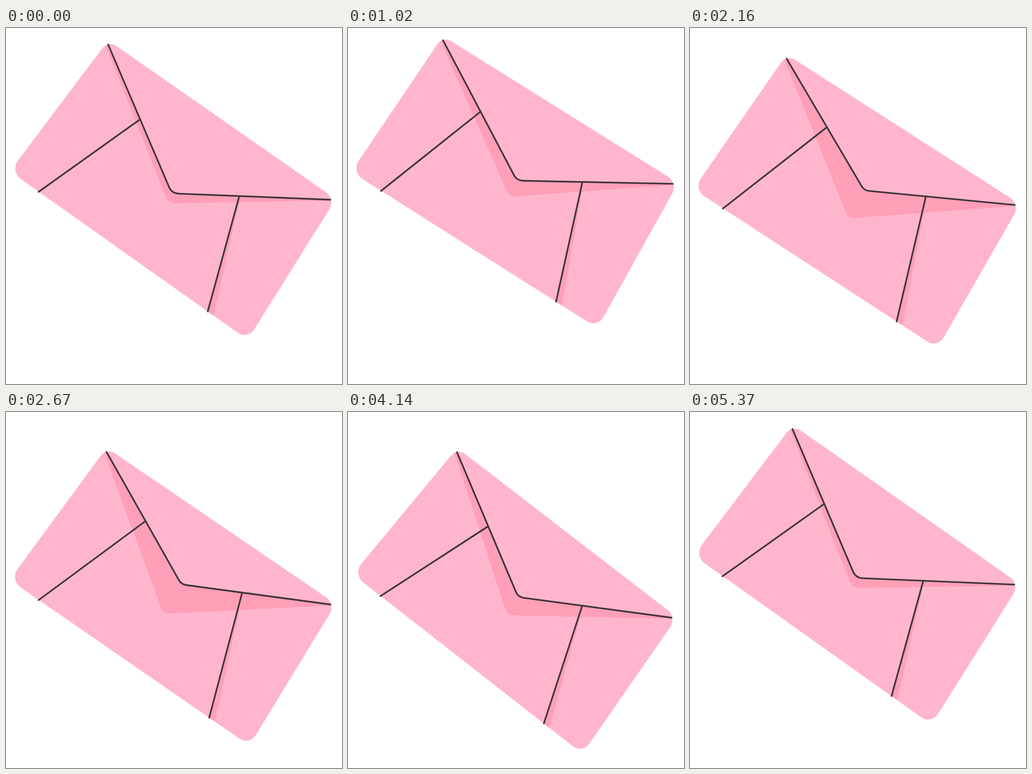
Recreate the animation shown at these times as an HTML page with a canvas. Size 727 px wide and 770 px high, loop 5.4 s.

```html
<!DOCTYPE html>
<html lang="en">
<head>
<meta charset="utf-8">
<title>Floating envelope</title>
<style>
  html, body { margin: 0; width: 100%; height: 100%; overflow: hidden; background: #fff; }
  canvas { display: block; width: 727px; height: 770px; }
</style>
</head>
<body>
<canvas id="stage" width="727" height="770"></canvas>
<script>
const ctx = document.getElementById("stage").getContext("2d");
const LOOP = 5400, STEP = 30;
const BODY = "#ffb6cd", SHADE = "#ff9fb8", INK = "#403738";

// Envelope space: origin midway between the two flap ends, x along the top.
const LEFT = [-293.1, 0], RIGHT = [293.1, 0];
const LEFT_FOOT = [-234.3, 347.6], RIGHT_FOOT = [214, 350];
const CORNERS = [
  [-298.1, -7.8, 22.3],
  [301.9, -7.8, 27],
  [319.9, 350.8, 24.7],
  [-310.7, 346.6, 28]
];

const mix = (a, b, k) => [a[0] + (b[0] - a[0]) * k, a[1] + (b[1] - a[1]) * k];

function bodyPath() {
  ctx.beginPath();
  ctx.moveTo(0, -7.8);
  for (let i = 1; i <= 4; i++) {
    const [x, y, r] = CORNERS[i % 4];
    const next = CORNERS[(i + 1) % 4];
    ctx.arcTo(x, y, next[0], next[1], r);
  }
  ctx.closePath();
}

function flapPath(a, tip, b, r) {
  ctx.beginPath();
  ctx.moveTo(...a);
  ctx.arcTo(...tip, ...b, r);
  ctx.lineTo(...b);
}

function line(a, b) {
  ctx.beginPath();
  ctx.moveTo(...a);
  ctx.lineTo(...b);
  ctx.stroke();
}

function draw(time) {
  const p = time / LOOP * Math.PI * 2;
  const c = Math.cos(p), s = Math.sin(p);

  const angle = 34.64 + 0.28 * c - 2.97 * s;
  const y = 368.75 - 25.1 * c - 35.1 * s;
  const tip = [2.9 + c, 165.4 + 19.7 * c];
  const shadeTip = [7.9 + 2.2 * c - 0.4 * s, 213.7 - 6.6 * c];
  const leftJoin = mix(LEFT, tip, 0.512 - 0.0095 * c);
  const rightJoin = mix(RIGHT, tip, 0.583 - 0.009 * c);

  ctx.setTransform(1, 0, 0, 1, 0, 0);
  ctx.fillStyle = "#fff";
  ctx.fillRect(0, 0, 727, 770);
  ctx.translate(360.5, y);
  ctx.rotate(angle * Math.PI / 180);
  ctx.translate(2.6, -172.6);

  bodyPath();
  ctx.fillStyle = BODY;
  ctx.fill();

  // Shadows stay inside the body
  ctx.save();
  ctx.clip();
  ctx.fillStyle = SHADE;
  ctx.beginPath();
  ctx.moveTo(...rightJoin);
  ctx.lineTo(rightJoin[0] + 2.2, rightJoin[1] - 1.3);
  ctx.lineTo(232.3, 358);
  ctx.lineTo(214.7, 358);
  ctx.fill();
  flapPath([-297, 4], shadeTip, [294, 2], 18);
  ctx.lineTo(...RIGHT);
  ctx.arcTo(...tip, ...LEFT, 22);
  ctx.lineTo(...LEFT);
  ctx.fill();
  ctx.restore();

  ctx.strokeStyle = INK;
  ctx.lineWidth = 3.6;
  ctx.lineCap = "round";
  line(LEFT_FOOT, leftJoin);
  line(RIGHT_FOOT, rightJoin);
  flapPath(LEFT, tip, RIGHT, 22);
  ctx.stroke();
}

let start = null;
function tick(now) {
  if (start === null) start = now;
  const time = (now - start) % LOOP;
  draw(Math.floor(time / STEP + 0.01) * STEP);
  requestAnimationFrame(tick);
}
draw(0);
requestAnimationFrame(tick);
</script>
</body>
</html>
```
